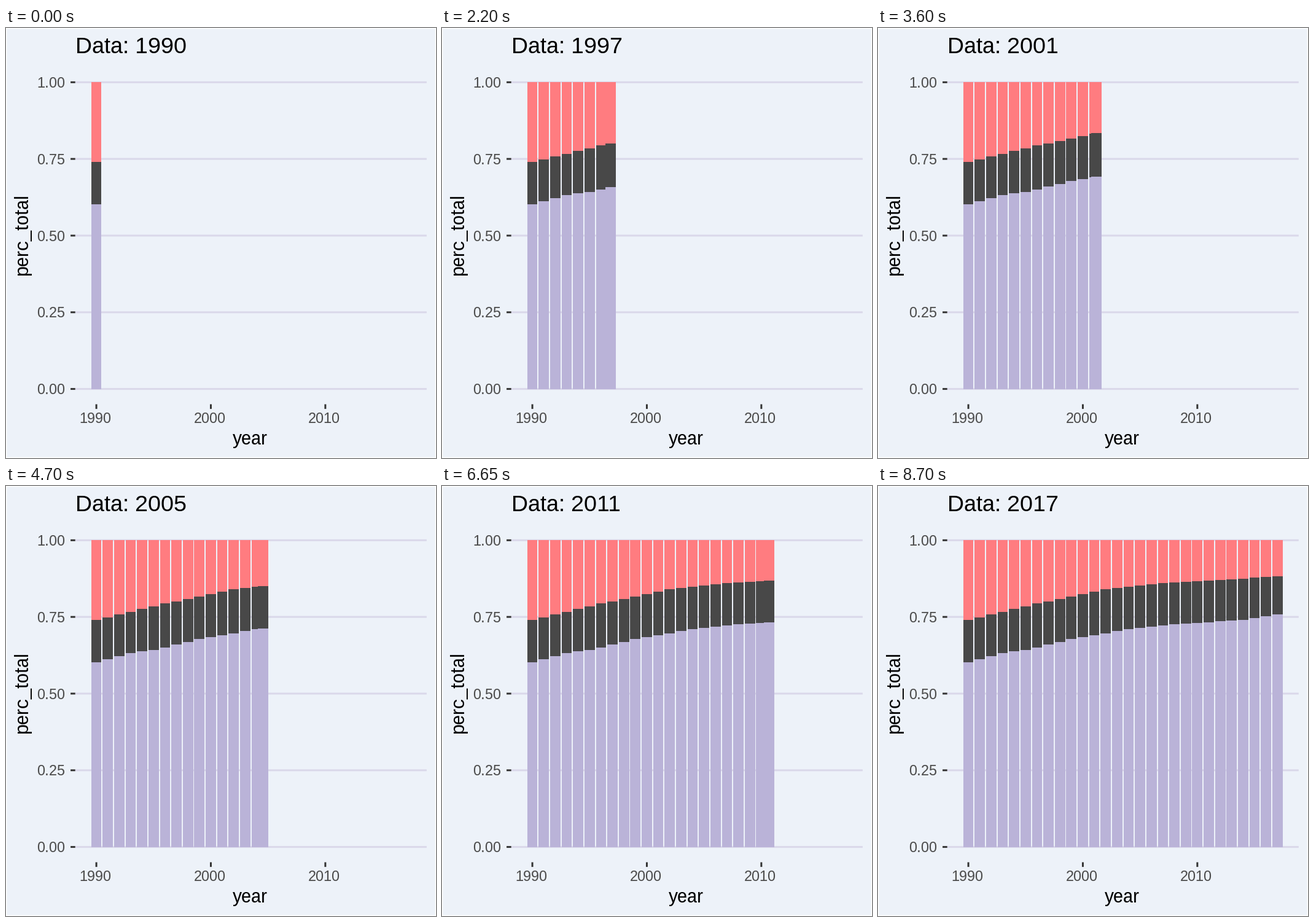
These frames come from a looping animation (700 px wide and 700 px high, 10000 ms). A matplotlib script:

```python
import numpy as np
import matplotlib.pyplot as plt
from matplotlib.animation import FuncAnimation
from matplotlib.patches import Rectangle

# Hinting factor 1 gives whole-pixel letter advances
plt.rcParams.update({"font.family": "Liberation Sans",
                     "text.hinting": "default", "text.hinting_factor": 1})

SIZE, DPI = 700, 100
FRAMES, LAST, INTERVAL = 200, 174, 50
FIRST_YEAR, SPAN = 1990, 27

BG, GRID, TICK, LABEL = "#EDF2F9", "#DAD8EA", "#333333", "#4D4D4D"
RED, DARK, LILAC = "#FF7C80", "#484848", "#BAB3D8"

LEFT, RIGHT, BOTTOM = 112.7, 684.8, 612.5    # panel edges
Y_ONE, Y_ZERO = 88.3, 587.6                  # pixel rows of 1.00 and 0.00
X0, STEP = 138.7, 18.638                     # left edge of first bar, one year
BAR_W = 0.9 * STEP
LINE, TICK_LEN = 2.96, 7.6


def dark_top(t):
    return np.interp(t, [0, 6, 12, 17, 27], [218, 191.4, 168.2, 158, 147.3])


def lilac_top(t):
    return np.interp(t, [0, 3, 5, 9, 14, 18, 24, 27],
                     [287, 271.9, 267, 249.4, 233, 225.2, 217.9, 209.4])


years = np.arange(SPAN + 1)
keys = np.round(years * LAST / SPAN)

fig = plt.figure(figsize=(SIZE / DPI, SIZE / DPI), dpi=DPI, facecolor=BG)
ax = fig.add_axes([0, 0, 1, 1])
ax.set(xlim=(0, SIZE), ylim=(SIZE, 0))
ax.axis("off")


def box(x0, y0, x1, y1, color, z=1, aa=True):
    patch = Rectangle((x0, y0), x1 - x0, y1 - y0, facecolor=color, linewidth=0,
                      zorder=z, antialiased=aa, snap=False)
    return ax.add_patch(patch)


def text(x, y, s, px, color="black", **kw):
    return ax.text(x, y, s, fontsize=px * 72 / DPI, color=color,
                   ha="left", va="baseline", **kw)


def snap(v):
    return np.floor(v + 0.5)


class Bar:
    """A stacked bar of three parts placed at a (fractional) year."""

    def __init__(self, z):
        self.parts = [box(0, 0, 1, 1, c, z, aa=False) for c in (RED, DARK, LILAC)]

    def place(self, t):
        x0, x1 = snap(X0 + STEP * t), snap(X0 + STEP * t + BAR_W)
        edges = snap(np.array([Y_ONE, dark_top(t), lilac_top(t), Y_ZERO]))
        for part, top, low in zip(self.parts, edges[:-1], edges[1:]):
            part.set_bounds(x0, top, x1 - x0, low - top)

    def show(self, on):
        for part in self.parts:
            part.set_visible(on)


# Light frame around the plot
edge = LINE / 2
for rect in ((0, 0, SIZE, edge), (0, SIZE - edge, SIZE, SIZE),
             (0, 0, edge, SIZE), (SIZE - edge, 0, SIZE, SIZE)):
    box(*rect, "white")

# Grid and axes
for v in np.linspace(0, 1, 5):
    y = Y_ZERO + (Y_ONE - Y_ZERO) * v
    box(LEFT, y - LINE / 2, RIGHT, y + LINE / 2, GRID)
    box(LEFT - TICK_LEN, y - LINE / 2, LEFT, y + LINE / 2, TICK)
    text(50, y + 8.6, f"{v:.2f}", 24.44, LABEL)

for k in (0, 10, 20):
    x = X0 + BAR_W / 2 + STEP * k
    box(x - LINE / 2, BOTTOM, x + LINE / 2, BOTTOM + TICK_LEN, TICK)
    text(x - 28, 643, str(FIRST_YEAR + k), 24.44, LABEL)

text(369.2, 678, "year", 30.56)
text(35, 403, "perc_total", 30.56, rotation=90, rotation_mode="anchor")
title = text(LEFT, 41, "", 36.67)

# Bars left behind, and the moving one on top of them
trail = [Bar(2) for _ in years]
for k, bar in enumerate(trail):
    bar.place(k)
mover = Bar(3)


def draw(i):
    i = min(i, LAST)
    for key, bar in zip(keys, trail):
        bar.show(key < i)
    mover.place(np.interp(i, keys, years))
    title.set_text(f"Data: {round(FIRST_YEAR + i * SPAN / LAST)}")
    return []


anim = FuncAnimation(fig, draw, frames=FRAMES, interval=INTERVAL,
                     init_func=lambda: draw(0), repeat=True, repeat_delay=0)
plt.show()
```
